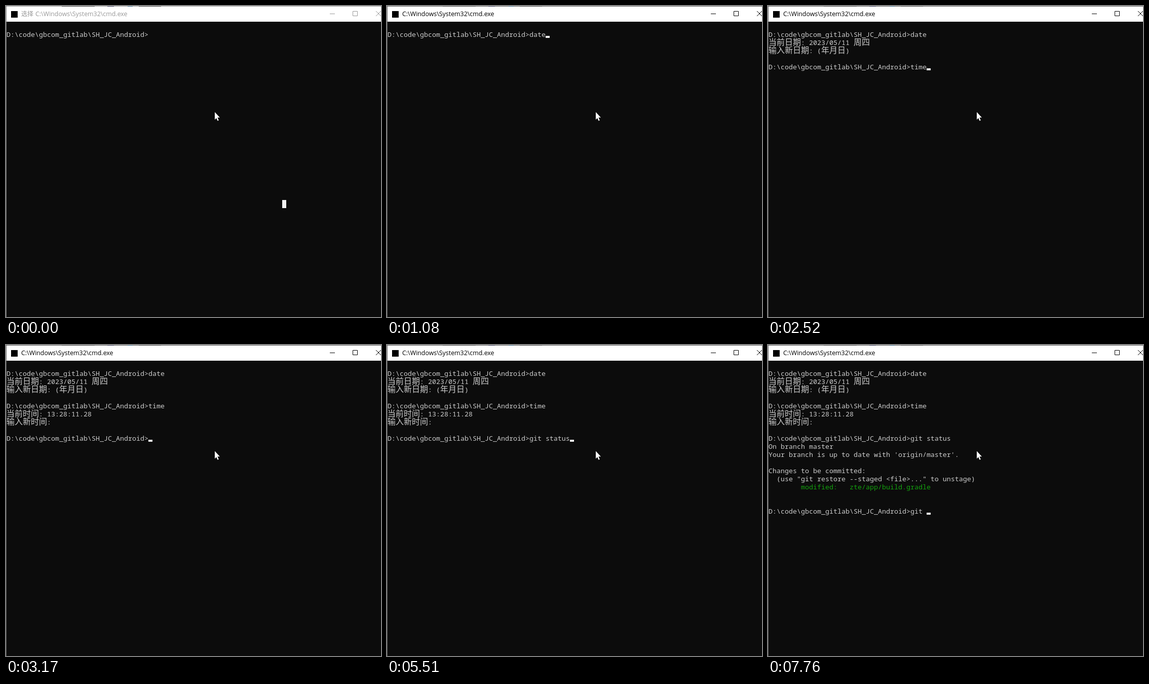
Recreate the animation shown at these times as an HTML page with a canvas. Size 740 by 614 pixels, loop 8000 ms.

```html
<!DOCTYPE html>
<html lang="zh">
<head>
<meta charset="utf-8">
<title>cmd.exe</title>
<style>
html, body { margin: 0; width: 100%; height: 100%; overflow: hidden; background: #0c0c0c; }
canvas { display: block; }
</style>
</head>
<body>
<canvas id="stage" width="740" height="614"></canvas>
<script>
const ctx = document.getElementById('stage').getContext('2d');
const LOOP = 8000, CELL = 8, ROW = 16, LEFT = 1, TOP = 47;
const CJK = '"Noto Sans CJK SC", "Noto Sans CJK", sans-serif';
const ASCII_FONT = '300 13.333px "Noto Sans Mono", "Liberation Mono", monospace';
const WIDE_FONT = '300 16px ' + CJK;
const PROMPT = 'D:\\code\\gbcom_gitlab\\SH_JC_Android>';
const GREEN = '\x01', PLAIN = '\x02';

// Terminal output: [ms, text appended, new title suffix]
const output = [
  [0, PROMPT],
  [270, 'd'], [720, 'a'], [900, 't'], [1080, 'e'],
  [1260, '\n当前日期: 2023/05/11 周四\n输入新日期: (年月日) ', ' - date'],
  [1890, '\n\n' + PROMPT, ''],
  [2250, 't'], [2340, 'i'], [2520, 'me'],
  [2800, '\n当前时间: 13:28:11.28\n输入新时间: ', ' - time'],
  [3090, '\n'],
  [3170, '\n' + PROMPT, ''],
  [3530, 'g'], [3620, 'i'], [3710, 't'], [3890, ' '], [4070, 's'],
  [4700, 't'], [4880, 'a'], [4970, 't'], [5240, 'u'], [5510, 's'],
  [6680, '\nOn branch master\nYour branch is up to date with \'origin/master\'.\n\n' +
    'Changes to be committed:\n  (use "git restore --staged <file>..." to unstage)\n        ',
    ' - git  status'],
  [6770, GREEN + 'modified:   zte/app/build.gradle' + PLAIN + '\n\n\n' + PROMPT, ''],
  [7400, 'g'], [7490, 'i'], [7670, 't'], [7760, ' ']
];

function rect(color, x, y, w, h) {
  ctx.fillStyle = color;
  ctx.fillRect(x, y, w, h);
}

function text(str, x, y, font, color) {
  ctx.font = font;
  ctx.fillStyle = color;
  ctx.fillText(str, x, y);
}

function drawTitleBar(selecting, suffix) {
  const ink = selecting ? '#999' : '#000';
  rect('#fff', 1, 1, 739, 30);
  rect(selecting ? '#999' : '#555', 0, 0, 740, 1);
  rect(selecting ? '#888' : '#666', 0, 0, 1, 614);

  // Sliver of the window behind
  rect('#333', 110, 0, 65, 1);
  rect('#224', 200, 0, 13, 1);
  rect('#257', 240, 0, 10, 1);
  rect('#333', 262, 0, 44, 1);

  rect('#000', 10, 10, 13, 13);
  if (selecting) text('选择', 30, 20, '12px ' + CJK, ink);
  text('C:\\Windows\\System32\\cmd.exe' + suffix, selecting ? 58 : 30, 20,
    '12.4px "Open Sans", sans-serif', ink);

  ctx.strokeStyle = ink;
  ctx.lineWidth = 1;
  ctx.stroke(new Path2D('M639 15.5h10 M684.5 10.5h9v9h-9z M730 10l10 10 M740 10l-10 10'));
}

function drawTerminal(buffer, selecting) {
  let row = 0, col = 0, color = '#ccc';
  const runs = buffer.match(/[\n\x01\x02]|[ -~]+|[^\x00-\xff]+/g);
  for (const run of runs) {
    if (run === '\n') { row++; col = 0; }
    else if (run === GREEN) color = '#13a10e';
    else if (run === PLAIN) color = '#ccc';
    else {
      const wide = run > '\xff';
      text(run, LEFT + col * CELL, TOP + row * ROW + 14, wide ? WIDE_FONT : ASCII_FONT, color);
      col += run.length * (wide ? 2 : 1);
    }
  }
  if (selecting) rect('#f2f2f2', LEFT + 68 * CELL, TOP + 21 * ROW, CELL, ROW);
  else rect('#f2f2f2', LEFT + col * CELL, TOP + row * ROW + 12, CELL, 4);
}

function drawPointer() {
  ctx.fillStyle = '#fff';
  ctx.fill(new Path2D('M412 209.5V224.5L415 221.3L417.6 226.7L419.8 225.8L417.4 220.2H422z'));
}

function draw(now) {
  const t = now % LOOP, selecting = t < 90;
  let buffer = '', suffix = '';
  for (const [ms, str, title] of output) {
    if (ms > t) break;
    buffer += str;
    suffix = title ?? suffix;
  }
  rect('#0c0c0c', 0, 0, 740, 614);
  drawTitleBar(selecting, suffix);
  drawTerminal(buffer, selecting);
  drawPointer();
}

const start = performance.now();
function tick() {
  draw(performance.now() - start);
  requestAnimationFrame(tick);
}
tick();
</script>
</body>
</html>
```
